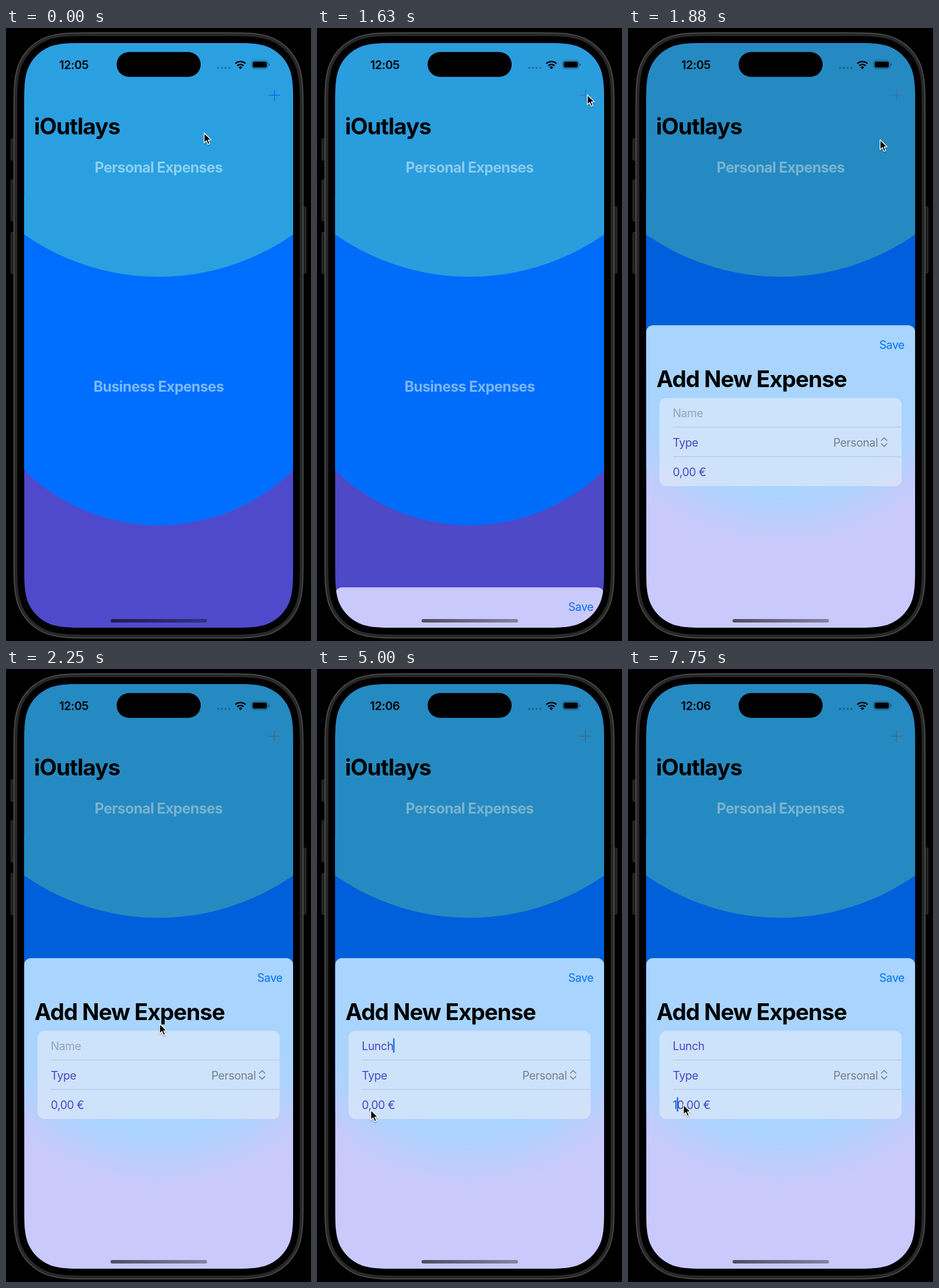
Write an HTML page that moves like this. It is 528 px wide and 1060 px high and loops after 8 s.

```html
<!DOCTYPE html>
<html lang="en">
<head>
<meta charset="utf-8">
<title>Expense sheet</title>
<style>
  html, body { margin: 0; width: 100%; height: 100%; overflow: hidden; background: #000; }
  svg { display: block; width: 528px; height: 1060px; }
  text { font-family: Inter, "Liberation Sans", sans-serif; font-size: 19.5px; letter-spacing: -.02em; white-space: pre; }
  .large { font-size: 39px; font-weight: 700; letter-spacing: -.027em; }
  .section { font-size: 25px; font-weight: 700; letter-spacing: -.025em; fill: #d8f4ff; opacity: .57; text-anchor: middle; }
  .clock { font-size: 20px; font-weight: 600; text-anchor: middle; }
  .field { fill: #4745c4; }
  .line { fill: none; stroke-linecap: round; stroke-linejoin: round; }
</style>
</head>
<body>
<svg viewBox="0 0 528 1060">
  <defs>
    <clipPath id="screen"><path id="glass"/></clipPath>
    <clipPath id="sheetClip"><rect id="sheetBox" x="31.5" width="465.5" height="700" rx="12"/></clipPath>
    <filter id="blur" x="-30%" y="-30%" width="160%" height="160%"><feGaussianBlur stdDeviation="35"/></filter>
    <filter id="shadow" x="-50%" y="-50%" width="200%" height="200%"><feDropShadow dx="0" dy="1.5" stdDeviation="1.2" flood-opacity=".35"/></filter>
    <linearGradient id="bar"><stop stop-opacity=".62"/><stop offset="1" stop-opacity=".35"/></linearGradient>
  </defs>

  <!-- phone body -->
  <g fill="#202020" stroke="#343434">
    <rect x="8.5" y="191.5" width="8" height="37" rx="1.5"/>
    <rect x="8.5" y="262.5" width="8" height="71" rx="1.5"/>
    <rect x="8.5" y="353.5" width="8" height="71" rx="1.5"/>
    <rect x="511.5" y="309.5" width="8" height="114" rx="1.5"/>
  </g>
  <path id="shell" fill="#282828" stroke="#555" stroke-width="1.5"/>
  <path id="bezel"/>

  <g clip-path="url(#screen)">
    <!-- main page -->
    <rect x="31" y="25" width="467" height="1013" fill="#4f4acb"/>
    <circle cx="264.3" cy="528" r="332" fill="#006eff"/>
    <circle cx="264.3" cy="23.5" r="406.7" fill="#2ba0e1"/>
    <text class="section" x="264.3" y="250">Personal Expenses</text>
    <text class="section" x="264.3" y="629">Business Expenses</text>
    <rect id="dim" x="31" y="25" width="467" height="1013"/>
    <text class="large" x="48.5" y="184">iOutlays</text>
    <path id="plus" d="M454.7 116.2h20M464.7 106.2v20" stroke-width="1.5"/>

    <!-- status bar -->
    <rect x="191.5" y="41.5" width="145.5" height="43" rx="21.5"/>
    <text id="clock" class="clock" x="117.5" y="71"></text>
    <path d="M367.2 69h20" class="line" stroke="#000" stroke-opacity=".32" stroke-width="3.4" stroke-dasharray="0 6.5"/>
    <g class="line" stroke="#000" stroke-width="2.6" style="stroke-linecap:butt">
      <path d="M397 61.6a12.4 12.4 0 0 1 17.6 0M400.3 65.2a7.9 7.9 0 0 1 11 0"/>
    </g>
    <path d="M405.8 71.2l-3.3-3.5a4.8 4.8 0 0 1 6.6 0z"/>
    <rect x="425" y="56" width="28.5" height="14.5" rx="4.6" fill="none" stroke="#000" stroke-opacity=".4" stroke-width="1.1"/>
    <rect x="426.9" y="57.9" width="24.7" height="10.7" rx="3"/>
    <path d="M455 61v4.6q1.6-.6 1.6-2.3t-1.6-2.3z" fill-opacity=".45"/>

    <!-- sheet: its material shows the page behind, so the tint stays put -->
    <g clip-path="url(#sheetClip)">
      <rect x="31" y="25" width="467" height="1013" fill="#cac9fb"/>
      <circle cx="264.3" cy="515" r="332" fill="#a8d4fe" filter="url(#blur)"/>
    </g>
    <g id="sheet">
      <text x="435" y="40.5" fill="#0070f5">Save</text>
      <text class="large" x="49.3" y="107">Add New Expense</text>
      <rect x="54.5" y="125.5" width="419.3" height="152.5" rx="12" fill="#f8f4f6" fill-opacity=".45"/>
      <path d="M78 176h395.8M78 227h395.8" stroke="#5a6a8a" stroke-opacity=".28"/>
      <text id="name" x="77.5" y="158.5"></text>
      <text class="field" x="77.5" y="209.5">Type</text>
      <text x="432.5" y="209.5" text-anchor="end" fill="#747f8d">Personal</text>
      <path class="line" d="M438.7 199l4.7-4.7 4.7 4.7M438.7 204.6l4.7 4.7 4.7-4.7" stroke="#747f8d" stroke-width="1.6"/>
      <text id="amount" class="field" x="77.5" y="260.5"></text>
      <rect id="caret" width="2.4" height="25" rx="1.2" fill="#0a6cf0"/>
    </g>
    <rect x="181" y="1022" width="167" height="6" rx="3" fill="url(#bar)"/>
  </g>

  <g id="pointer">
    <path d="M.5 1v17l4-3.7 2.7 6.5 3-1.3-2.7-6.3h5.3z" stroke="#fff" stroke-width="1.3" stroke-linejoin="round" filter="url(#shadow)"/>
  </g>
</svg>
<script>
const $ = id => document.getElementById(id);
const set = (id, attrs) => { for (const k in attrs) $(id).setAttribute(k, attrs[k]); };
const clamp = (v, lo = 0, hi = 1) => Math.min(hi, Math.max(lo, v));

const LOOP = 8000, STEP = 125;
const REST = 500, HIDDEN = 1037;        // sheet top, open and closed
const FOCUS_NAME = 2875, FOCUS_AMOUNT = 6000, TYPE_AMOUNT = 7500;

// pointer path: time, x, y
const path = [
  [60, 342.5, 180.5], [1250, 467.5, 114.5], [1750, 467.5, 114.5], [2250, 265.5, 612.5],
  [2375, 265.5, 612.5], [2875, 256.5, 643.5], [4250, 256.5, 643.5], [5125, 83, 768.5],
  [5250, 82, 769], [5375, 82, 769], [5875, 95.5, 752.5]
];

// rectangle whose corners ease into the straight sides
function smoothRect(x0, y0, x1, y1, r) {
  const corner = [[1.528, 0], [1.088, 0], [.868, 0], [.631, .075], [.372, .169],
    [.169, .372], [.075, .631], [0, .868], [0, 1.088], [0, 1.528]];
  const place = (list, x, y, sx, sy) => list.map(([a, b]) => [x + sx * a * r, y + sy * b * r]);
  const back = [...corner].reverse();
  const parts = [place(corner, x0, y0, 1, 1), place(back, x0, y1, 1, -1),
    place(corner, x1, y1, -1, -1), place(back, x1, y0, -1, 1)];
  return 'M' + parts.map(([first, ...rest]) => `${first}C${rest.join(' ')}`).join('L') + 'z';
}

function pointerAt(t) {
  const i = path.findIndex(p => p[0] > t);
  if (i < 0) return path[path.length - 1].slice(1);
  if (!i) return path[0].slice(1);
  const [t0, x0, y0] = path[i - 1], [t1, x1, y1] = path[i];
  const u = (t - t0) / (t1 - t0), e = u * u * (3 - 2 * u);
  return [x0 + (x1 - x0) * e, y0 + (y1 - y0) * e];
}

// critically damped spring, 0 to 1
function spring(ms) {
  const x = 19.5 * Math.max(0, ms) / 1000;
  return 1 - (1 + x) * Math.exp(-x);
}

function drawPlus(t) {
  const fade = clamp((t - 1750) / 375);
  if (t < 1500) set('plus', { stroke: '#0a66f2', opacity: .9 });
  else if (!fade) set('plus', { stroke: '#104a80', opacity: .3 });
  else set('plus', { stroke: '#4c6478', opacity: .3 + .6 * fade });
}

function drawFields(t) {
  const typed = 'Lunch'.slice(0, clamp(Math.floor((t - 3250) / STEP), 0, 5));
  $('name').textContent = typed || 'Name';
  set('name', { fill: typed ? '#4745c4' : '#94a4b6' });
  $('amount').textContent = t < TYPE_AMOUNT ? '0,00 €' : '10,00 €';

  const inAmount = t >= FOCUS_AMOUNT;
  let pos = typed.length;
  if (inAmount) pos = t < TYPE_AMOUNT ? 4 - clamp(Math.floor((t - 6500) / STEP), 0, 4) : 1;
  const lead = pos ? $(inAmount ? 'amount' : 'name').getSubStringLength(0, pos) : 0;
  const blinkOff = t >= 4500 && !inAmount && Math.floor(t / 500) % 2;
  set('caret', {
    x: 77 + lead,
    y: inAmount ? 240.5 : 138.5,
    opacity: t < FOCUS_NAME || blinkOff ? 0 : 1
  });
}

function frame() {
  const t = Math.floor(performance.now() % LOOP / STEP) * STEP;
  const open = spring(t - 1593);
  const top = HIDDEN + (REST - HIDDEN) * open;
  set('sheetBox', { y: top });
  set('sheet', { transform: `translate(0 ${top})` });
  set('dim', { opacity: .14 * open });
  set('pointer', { transform: `translate(${pointerAt(t)})` });
  $('clock').textContent = t < 4875 ? '12:05' : '12:06';
  drawPlus(t);
  drawFields(t);
  requestAnimationFrame(frame);
}

set('shell', { d: smoothRect(13.7, 8.2, 514.3, 1054.8, 92) });
set('bezel', { d: smoothRect(19.5, 14, 508.5, 1049, 86) });
set('glass', { d: smoothRect(31.5, 26, 497, 1037, 74) });
frame();
</script>
</body>
</html>
```
